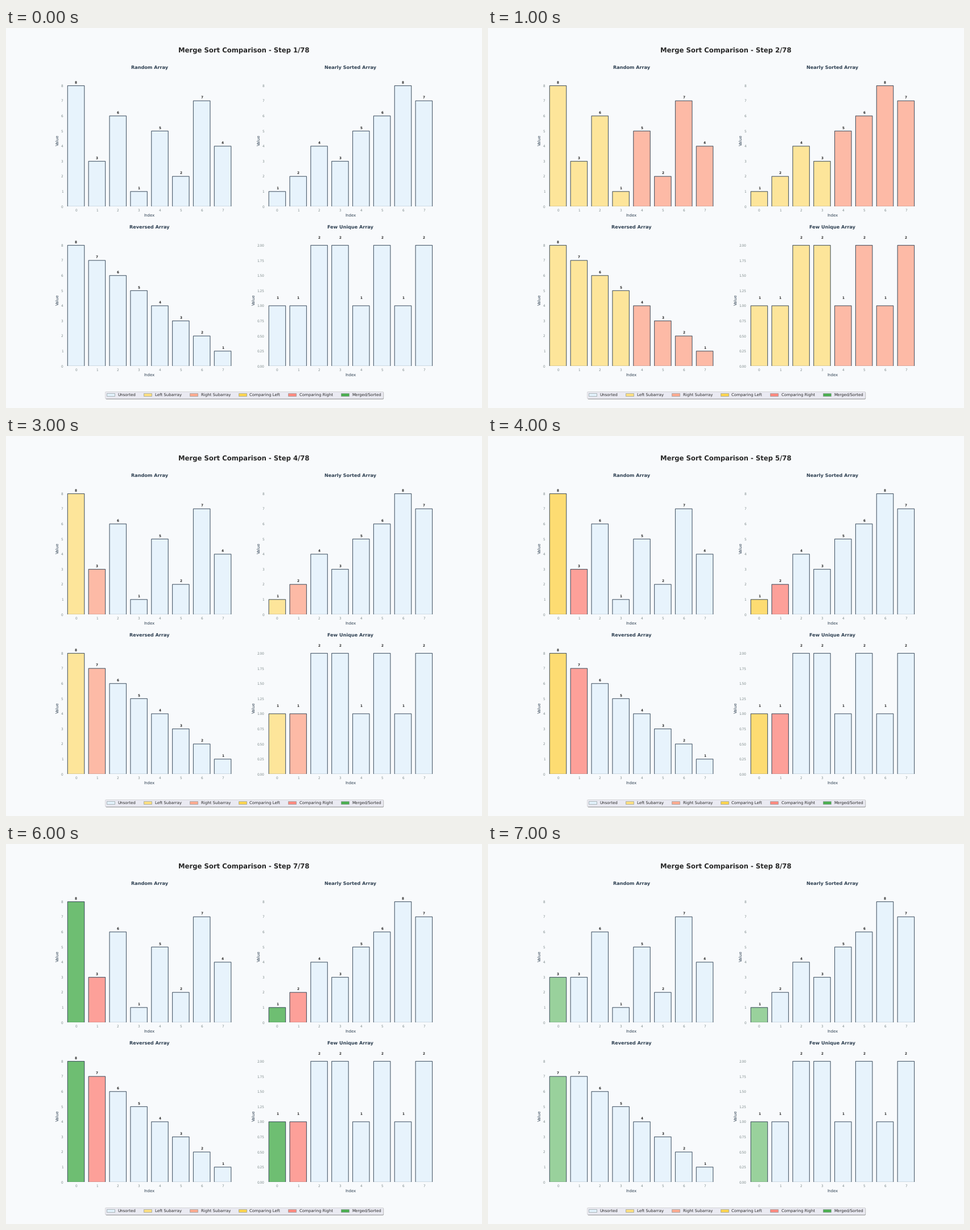
Recreate the animation shown at these times as a matplotlib script. Size 837 px wide and 669 px high, loop 8 s.

```python
import matplotlib.pyplot as plt
from matplotlib.animation import FuncAnimation
from matplotlib.patches import Patch

WIDTH, HEIGHT, DPI = 837, 669, 64
PT = WIDTH / 20 / DPI  # layout is a 20-inch wide sheet scaled to the stage

BACK, INK, DARK, GRAY = "#F8FAFC", "#262626", "#2C3E50", "#7F8C8D"
UNSORTED, LEFT, RIGHT = "#E3F2FD", "#FFE082", "#FFAB91"
COMP_LEFT, COMP_RIGHT = "#FFD54F", "#FF8A80"
MERGED, PLACED = "#4CAF50", "#81C784"

ARRAYS = {
    "Random Array": [8, 3, 6, 1, 5, 2, 7, 4],
    "Nearly Sorted Array": [1, 2, 4, 3, 5, 6, 8, 7],
    "Reversed Array": [8, 7, 6, 5, 4, 3, 2, 1],
    "Few Unique Array": [1, 1, 2, 2, 1, 2, 1, 2],
}
LEGEND = {
    "Unsorted": UNSORTED,
    "Left Subarray": LEFT,
    "Right Subarray": RIGHT,
    "Comparing Left": COMP_LEFT,
    "Comparing Right": COMP_RIGHT,
    "Merged/Sorted": MERGED,
}
COUNT, TOTAL_STEPS = 8, 78


def split(size):
    return [LEFT] * size + [RIGHT] * size


# Leading bar colours per step; the remaining bars are unsorted.
STEPS = [
    [],
    split(4),
    split(2),
    split(1),
    [COMP_LEFT, COMP_RIGHT],
    [COMP_LEFT, COMP_RIGHT],
    [MERGED, COMP_RIGHT],
    [PLACED],
]

plt.rcParams.update({
    "font.family": "DejaVu Sans",
    "text.hinting": "none",
    "text.color": INK,
    "patch.linewidth": PT,
})

fig, axes = plt.subplots(2, 2, figsize=(WIDTH / DPI, HEIGHT / DPI), dpi=DPI,
                         facecolor=BACK)
fig.subplots_adjust(left=0.125, right=0.9, bottom=0.11, top=0.88,
                    wspace=0.2, hspace=0.2)
heading = fig.suptitle("", y=0.95, fontsize=20 * PT, fontweight="bold")


def make_panel(ax, title, values):
    ax.set_facecolor(BACK)
    ax.spines[:].set_visible(False)
    ax.set_xlim(-0.5, COUNT - 0.5)
    ax.set_ylim(0, max(values) * 1.1)
    ax.set_xticks(range(COUNT))
    if max(values) == COUNT:
        ax.set_yticks(range(COUNT + 1))
    else:
        ax.set_yticks([i / 4 for i in range(COUNT + 1)])
    ax.tick_params(length=0, pad=7 * PT, labelsize=10 * PT, labelcolor=GRAY)
    ax.set_title(title, fontsize=14 * PT, fontweight="bold", color=DARK,
                 pad=15 * PT)
    label = dict(fontsize=12 * PT, color=DARK, labelpad=4 * PT)
    ax.set_xlabel("Index", **label)
    ax.set_ylabel("Value", **label)

    bars = ax.bar(range(COUNT), values, width=0.8, edgecolor=DARK,
                  linewidth=2 * PT, alpha=0.8, snap=False)
    tags = [ax.text(i, 0, "", ha="center", va="bottom", fontsize=10 * PT,
                    fontweight="bold") for i in range(COUNT)]
    return values, bars, tags


panels = [make_panel(ax, title, values)
          for ax, (title, values) in zip(axes.flat, ARRAYS.items())]

fig.legend(
    handles=[Patch(facecolor=color, edgecolor=GRAY, label=name)
             for name, color in LEGEND.items()],
    loc="lower center", bbox_to_anchor=(0.5, 0.02), ncol=len(LEGEND),
    fontsize=12 * PT, facecolor="#EAEAF2", edgecolor="0.8", framealpha=1,
    fancybox=True, shadow={"ox": 2 * PT, "oy": -2 * PT},
)


def draw(step):
    heading.set_text(f"Merge Sort Comparison - Step {step + 1}/{TOTAL_STEPS}")
    colors = STEPS[step] + [UNSORTED] * (COUNT - len(STEPS[step]))
    for start, bars, tags in panels:
        values = list(start)
        if PLACED in colors:
            values[0] = min(values[:2])
        for bar, tag, value, color in zip(bars, tags, values, colors):
            bar.set_height(value)
            bar.set_facecolor(color)
            tag.set_y(value + 0.1)
            tag.set_text(str(value))


anim = FuncAnimation(fig, draw, frames=len(STEPS), init_func=lambda: draw(0),
                     interval=1000, repeat=True, repeat_delay=0)
plt.show()
```
